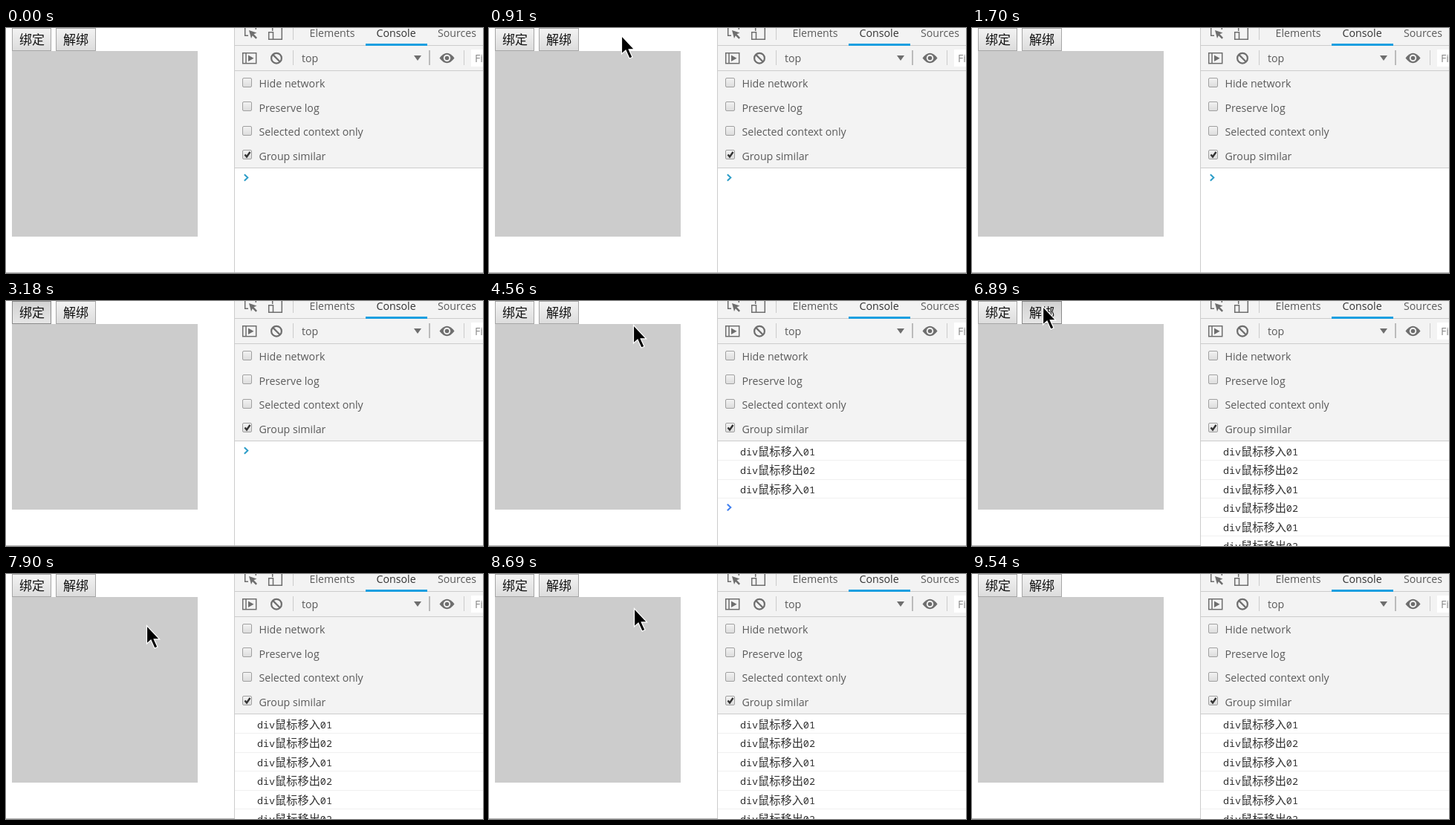
Write an HTML page that moves like this. It is 642 px wide and 330 px high and loops after 9860 ms.

```html
<!DOCTYPE html>
<html lang="zh">
<head>
<meta charset="utf-8">
<title>Bind and unbind</title>
<style>
  html, body { margin: 0; width: 100%; height: 100%; overflow: hidden; background: #fff; }
  svg { display: block; width: 642px; height: 330px; }
  .ui { font: 14.2px "Open Sans", "Noto Sans", sans-serif; fill: #5a5a5a; }
  .mono { font: 13.4px "Noto Sans Mono", "DejaVu Sans Mono", monospace; fill: #303030; }
  .cjk { font: 15.2px "Noto Sans CJK SC", "Noto Sans CJK", sans-serif; }
  .btn { font: 17px "Noto Sans CJK SC", "Noto Sans CJK", sans-serif; fill: #111; }
  .rule { stroke: #ccc; fill: none; }
  .icon { stroke: #6e6e6e; stroke-width: 1.5; fill: none; }
  .bold { stroke-width: 2.2; }
  .solid { fill: #6e6e6e; }
</style>
</head>
<body>
<svg viewBox="0 0 642 330">
  <defs>
    <linearGradient id="normal" x2="0" y2="1">
      <stop offset="0" stop-color="#f3f3f3"/><stop offset="1" stop-color="#dcdcdc"/>
    </linearGradient>
    <linearGradient id="hover" x2="0" y2="1">
      <stop offset="0" stop-color="#f8f8f8"/><stop offset="1" stop-color="#e4e4e4"/>
    </linearGradient>
    <linearGradient id="press" x2="0" y2="1">
      <stop offset="0" stop-color="#d2d2d2"/><stop offset="1" stop-color="#e6e6e6"/>
    </linearGradient>
  </defs>

  <rect width="642" height="330" fill="#fff"/>
  <rect x="8" y="31" width="250" height="250" fill="#ccc"/>
  <rect id="bind" x="8.5" y=".5" width="52" height="30"/>
  <text class="btn" x="18" y="22">绑定</text>
  <rect id="unbind" x="67.5" y=".5" width="53" height="30"/>
  <text class="btn" x="77" y="22">解绑</text>

  <rect x="308" width="334" height="188" fill="#f3f3f3"/>
  <path class="rule" d="M307.5 0V330M308 23.5H642M308 57.5H642M308 188.5H642M386.5 0V16M386.5 30V50M616.5 30V50"/>
  <path d="M570 30V50" stroke="#bbb" stroke-width="2"/>
  <rect x="484" y="21" width="83" height="3" fill="#1a9fe0"/>

  <path class="icon" d="M321.7 0V10.3H326M336.3 0V2"/>
  <path class="solid" d="M327 3L337.5 6.5L333.5 8.3L338 13L336.3 14.7L331.8 10.2L330 14Z"/>
  <path class="icon" d="M358.7 0V4M371.3 0V15.3H353.7V5.7H359.5V15"/>
  <rect class="icon" x="318.7" y="33.7" width="18" height="14"/>
  <path class="icon" d="M323 34V48"/>
  <path class="solid" d="M326 36.5L333.5 40.7L326 45Z"/>
  <circle class="icon bold" cx="364" cy="40.7" r="6.9"/>
  <path class="icon bold" d="M359.2 35.9L368.8 45.5"/>
  <path class="solid" d="M549 37H559L554 44Z"/>
  <path class="solid" d="M583.5 40.5Q593.5 27 603.5 40.5Q593.5 54 583.5 40.5Z"/>
  <circle cx="593.5" cy="40.5" r="4.7" fill="#f3f3f3"/>
  <circle class="solid" cx="593.5" cy="40.5" r="2.8"/>
  <rect x="626" y="29" width="16" height="23" fill="#fff"/>

  <g class="ui">
    <text x="408.5" y="12">Elements</text>
    <text x="498.5" y="12" fill="#333">Console</text>
    <text x="581" y="12">Sources</text>
    <text x="398" y="46">top</text>
    <text x="631" y="46" fill="#888">Fi</text>
  </g>
  <g id="options" class="ui"></g>
  <g id="logs"></g>
  <path id="prompt" d="M320.8 197.3L325.3 201.5L320.8 205.7" fill="none" stroke-width="2"/>
  <path d="M0 329.5H308" stroke="#b4b4b4"/>
  <path id="edge" d="M308 329.5H642" stroke="#b4b4b4"/>
  <path id="cursor" d="M.5 .5V25L6 20L11 31L15 29.3L10.2 18.8H17.6Z" fill="#000" stroke="#fff" stroke-width="1.2"/>
</svg>
<script>
const LOOP = 9860, TICK = 76, ROW = 25.5;
const $ = id => document.getElementById(id);
const set = (id, attrs) => Object.entries(attrs).forEach(([k, v]) => $(id).setAttribute(k, v));

// Each glide eases on from where the one before ended; a lost pointer vanishes on arrival.
const glides = [];
const glide = (start, steps, x, y, lost) => glides.push({ start, steps, x, y, lost });

glide(0, 1, 555, 349, true);
glide(220, 3, 271, 209);
glide(600, 5, 178, 10);
glide(1140, 8, 170, 50, true);
glide(2010, 8, 30, 7);
glide(3090, 2, 30, 7, true);
glide(3640, 4, 130, 46);
glide(3944, 4, 196, 14);
glide(4410, 3, 194, 34);
glide(4790, 3, 195, 11);
glide(5180, 4, 195, 45);
glide(5650, 8, 174, 1, true);
glide(6380, 4, 95, 7);
glide(7350, 3, 172, 8, true);
glide(7730, 3, 189, 69);
glide(8050, 4, 190, 4);
glide(8600, 2, 195, 46);
glide(9070, 7, 572, 310, true);

const clicks = { bind: 3090, unbind: 6810 };

function pointer(t) {
  const n = glides.findLastIndex(g => t >= g.start);
  const to = glides[n], from = glides[n - 1] || to;
  const step = Math.min(to.steps, Math.floor((t - to.start) / TICK) + 1);
  const ease = 1 - (1 - step / to.steps) ** 2;
  const mix = key => Math.round(from[key] + (to[key] - from[key]) * ease);
  return { x: mix("x"), y: mix("y"), shown: !(to.lost && step === to.steps) };
}

const within = (p, left, top, right, bottom) => p.x >= left && p.x < right && p.y >= top && p.y < bottom;
const inBox = p => within(p, 8, 31, 258, 281);

// Crossing the box edge writes a line while the handlers are bound.
const logTimes = [];
for (let t = clicks.bind; t < clicks.unbind; t++) {
  if (inBox(pointer(t)) !== inBox(pointer(t - 1))) logTimes.push(t);
}

$("options").innerHTML = ["Hide network", "Preserve log", "Selected context only", "Group similar"]
  .map((label, i) => {
    const top = Math.floor(67 + i * 32.5) + .5;
    const tick = i === 3 ? `<path d="M321.5 ${top + 6}L324 ${top + 9}L328.5 ${top + 2.5}" fill="none" stroke="#333" stroke-width="2.4"/>` : "";
    return `<rect x="318.5" y="${top}" width="12" height="12" rx="1.5" fill="url(#normal)" stroke="#a0a0a0"/>${tick}
      <text x="340.5" y="${80 + i * 32.5}">${label}</text>`;
  }).join("");

$("logs").innerHTML = logTimes.map((_, i) => {
  const [verb, code] = i % 2 ? ["移出", "02"] : ["移入", "01"];
  return `<g><text class="mono" x="338" y="${207.5 + i * ROW}">div<tspan class="cjk">鼠标${verb}</tspan>${code}</text>
    <path d="M308 ${Math.round(214 + i * ROW) + .5}H642" stroke="#f0f0f0"/></g>`;
}).join("");
const rows = [...$("logs").children];

function paintButton(id, t, hovered) {
  const pressed = t >= clicks[id] && t < clicks[id] + TICK * 2 && hovered;
  const state = pressed ? "press" : hovered ? "hover" : "normal";
  const stroke = { normal: "#a6a6a6", hover: "#777", press: "#8a8a8a" }[state];
  set(id, { fill: `url(#${state})`, stroke });
}

const visibility = on => ({ visibility: on ? "visible" : "hidden" });

function draw(t) {
  const p = pointer(t);
  paintButton("bind", t, within(p, 8, 0, 61, 31));
  paintButton("unbind", t, within(p, 67, 0, 121, 31));
  const count = logTimes.filter(time => t >= time).length;
  rows.forEach((row, i) => row.setAttribute("visibility", i < count ? "visible" : "hidden"));
  set("prompt", { transform: `translate(0 ${count * ROW})`, stroke: count ? "#3f7ff0" : "#2b9dc8" });
  set("edge", visibility(count < 5));
  set("cursor", { transform: `translate(${p.x} ${p.y})`, ...visibility(p.shown) });
}

const begin = performance.now();
function frame() {
  draw((performance.now() - begin) % LOOP);
  requestAnimationFrame(frame);
}
frame();
</script>
</body>
</html>
```
